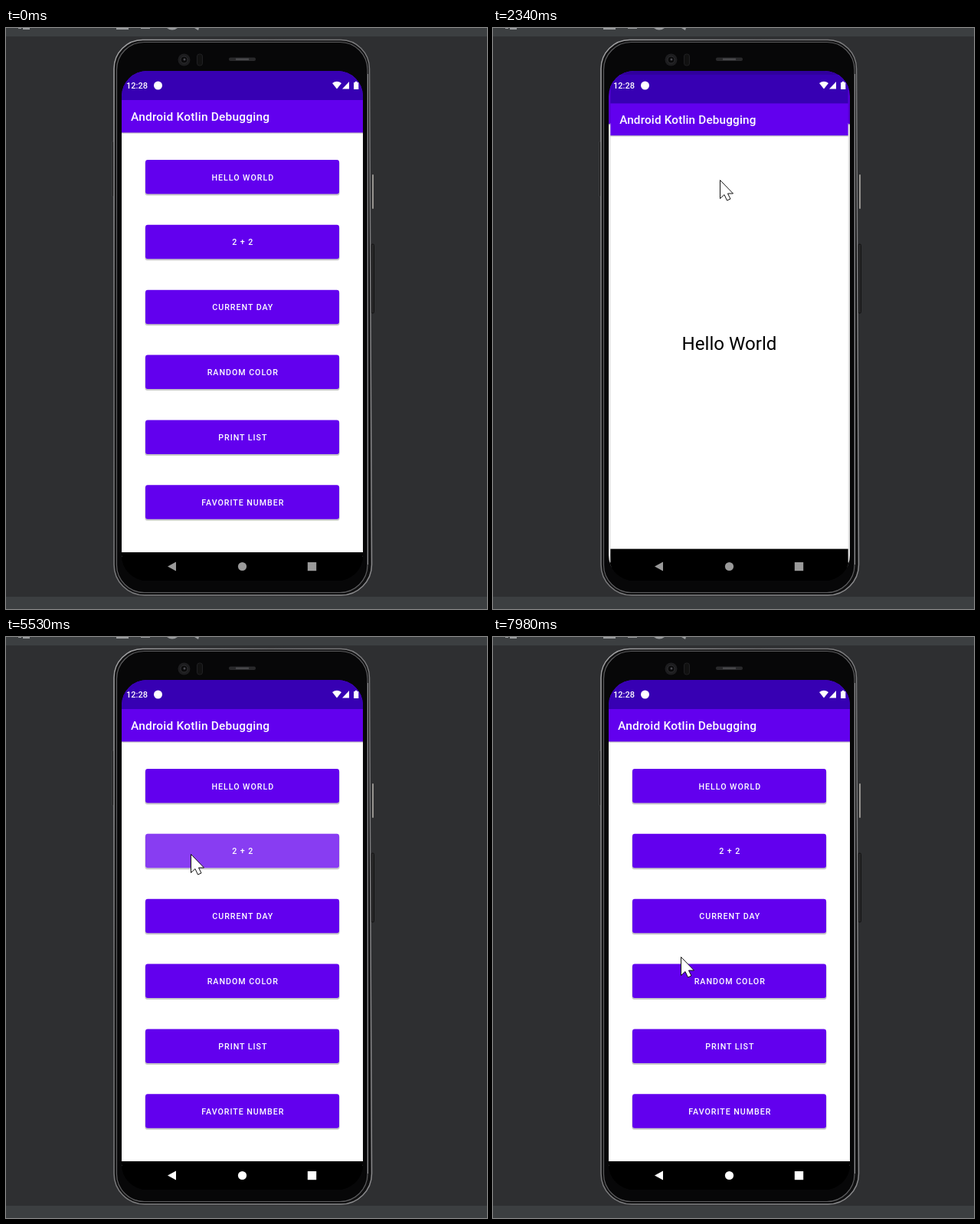
Write an HTML page that moves like this. It is 628 px wide and 758 px high and loops after 8000 ms.

```html
<!DOCTYPE html>
<html lang="en">
<head>
<meta charset="utf-8">
<title>Phone emulator</title>
<style>
html, body { margin: 0; width: 100%; height: 100%; overflow: hidden; background: #2e2f31; }
svg { display: block; }
text { font-family: Roboto, sans-serif; }
.page { transform-origin: 308.5px 388.5px; }
.title { font-size: 15.5px; font-weight: 500; letter-spacing: .0125em; fill: #fff; }
.label { font-size: 10.7px; font-weight: 500; letter-spacing: .956px; fill: #fff; text-anchor: middle; }
.answer { font-size: 24.5px; text-anchor: middle; }
</style>
</head>
<body>
<svg id="stage" width="628" height="758" viewBox="0 0 628 758">
  <defs>
    <clipPath id="screen">
      <rect x="151" y="56" width="315" height="665" rx="33"/>
    </clipPath>
    <linearGradient id="shade" x2="0" y2="1">
      <stop stop-opacity=".28"/><stop offset="1" stop-opacity="0"/>
    </linearGradient>
    <linearGradient id="rim" x2="1" y2="1">
      <stop stop-color="#a4a4a6"/><stop offset=".3" stop-color="#747476"/><stop offset="1" stop-color="#8a8a8c"/>
    </linearGradient>
    <g id="frame">
      <rect x="151" y="120" width="315" height="570" fill="#fff"/>
      <rect x="151" y="56" width="315" height="80.500" fill="#6200ee"/>
      <rect x="151" y="56" width="315" height="38" fill="#3700b3"/>
      <rect x="151" y="136.500" width="315" height="2" fill="url(#shade)"/>
      <rect x="151" y="684" width="315" height="37"/>
      <text class="title" x="163" y="121">Android Kotlin Debugging</text>
    </g>
  </defs>

  <!-- emulator window -->
  <rect width="628" height="758" fill="#2e2f31"/>
  <path d="M0 0H628V11H0ZM0 742H628V758H0Z" fill="#3c3f41"/>
  <path d="M16 0H20V1H16ZM22 0H31V2H22ZM144 0H160V2H144ZM176 0H188V1H176ZM210 0H224Q217 5 210 0ZM246 0H252L251 3Z" fill="#9a9c9e"/>

  <!-- phone body -->
  <rect x="138.500" y="148" width="3" height="72" rx="1" fill="#1b1b1c" stroke="#454547" stroke-width=".7"/>
  <rect x="477" y="282" width="3.500" height="90" rx="1.500" fill="#29292a" stroke="#111"/>
  <rect x="478" y="191" width="2" height="45" rx="1" fill="#96938f"/>
  <path d="M141 53A37.500 37.500 0 0 1 178.500 15.500H437A37.500 37.500 0 0 1 474.500 53L477.500 700A40 40 0 0 1 437.500 740H181A40 40 0 0 1 141 700Z" fill="#111112" stroke="url(#rim)" stroke-width="1.500"/>
  <rect x="144.500" y="18.500" width="327.500" height="718" rx="36" fill="#070708" stroke="#5c5c5e" stroke-width="1.200"/>
  <path d="M472.500 60V700" stroke="#8d8d8f"/>
  <circle cx="232.500" cy="41.500" r="8" fill="#1d1d1f"/>
  <circle cx="232.500" cy="41.500" r="4.500" fill="#0a0a0b" stroke="#303033"/>
  <circle cx="233" cy="41" r="1.500" fill="#4a4a50"/>
  <rect x="249.500" y="34" width="7" height="15" rx="3" fill="#111" stroke="#202022"/>
  <rect x="291" y="38.500" width="35" height="4.500" rx="2" fill="#29292b"/>
  <rect x="300" y="39.500" width="17" height="2.500" fill="#47474a"/>

  <g clip-path="url(#screen)">
    <rect x="151" y="56" width="315" height="665"/>
    <g id="list" class="page">
      <use href="#frame"/>
      <g id="buttons"></g>
      <svg id="ripple" x="182" width="253" height="45">
        <circle id="wave" cy="30" fill="#fff" opacity=".24"/>
      </svg>
    </g>
    <rect id="dim" x="151" y="56" width="315" height="665"/>
    <g id="detail" class="page">
      <use href="#frame"/>
      <text id="answer" class="answer" x="308.500" y="420"></text>
    </g>
  </g>

  <!-- status bar and navigation -->
  <g fill="#fff">
    <text x="157" y="79" font-size="11" font-weight="500">12:28</text>
    <circle cx="198.500" cy="75" r="5.500"/>
    <path d="M426 72Q432 67.500 438 72L432 79.500ZM448 70V79.500H439Z"/>
    <path d="M454 71H455.700V69.800H458.500V71H460.300V80H454Z"/>
  </g>
  <g id="nav">
    <path d="M211 702.500L222 696.500V708.500Z"/>
    <circle cx="308.500" cy="702.500" r="5.600"/>
    <rect x="393.800" y="697" width="11.400" height="11.200"/>
  </g>

  <g id="cursor">
    <circle id="press" r="18" fill="#ff0" opacity=".5"/>
    <path d="M.5 .5V24.500L6 19.500L9.500 27L14 25L10.500 18H17.500Z" fill="#fff" stroke="#111" stroke-width="1"/>
  </g>
</svg>

<script>
const $ = id => document.getElementById(id);
const LOOP = 8000, ANIM = 400, PRESS = 210;

const labels = ['HELLO WORLD', '2 + 2', 'CURRENT DAY', 'RANDOM COLOR', 'PRINT LIST', 'FAVORITE NUMBER'];
const rowY = i => 172 + i * 84.85;
$('buttons').innerHTML = labels.map((label, i) => {
  const y = rowY(i);
  return `<rect x="181.500" y="${y + 1.5}" width="254" height="45" rx="3" opacity=".22"/>
    <rect x="182" y="${y}" width="253" height="44.500" rx="3" fill="#6200ee"/>
    <text class="label" x="309.300" y="${y + 26.5}">${label}</text>`;
}).join('');

const visits = [
  { tap: 1720, open: 2190, back: 3660, close: 3960, x: 297, row: 0, text: 'Hello World' },
  { tap: 5190, open: 5660, back: 7100, close: 7400, x: 241, row: 1, text: '4' }
];

// time, x, y of the pointer tip
const path = [
  [630, 528, 714], [860, 390, 360], [1180, 306, 143], [1390, 297, 203], [1720, 297, 202],
  [2000, 297, 202], [2300, 296, 198], [2480, 296, 198], [2980, 217, 731], [3110, 217, 731],
  [3390, 212, 704], [3900, 212, 704], [4360, 258, 413], [4430, 253, 381], [4710, 241, 283],
  [5900, 241, 283], [6010, 242, 310], [6150, 245, 411], [6770, 225, 683], [6960, 218, 706],
  [7340, 218, 706], [7840, 241, 450], [7980, 245, 417]
];

const clamp = u => Math.min(1, Math.max(0, u));
const mix = (a, b, u) => a + (b - a) * u;
const within = (t, start, length) => t >= start && t < start + length;

function pointer(t) {
  const i = path.findIndex(p => p[0] > t);
  if (i < 1) return path.at(i ? -1 : 0).slice(1);
  const [a, b] = [path[i - 1], path[i]], u = (t - a[0]) / (b[0] - a[0]);
  return [mix(a[1], b[1], u), mix(a[2], b[2], u)];
}

const bezier = (a, b, c, d, u) =>
  a * (1 - u) ** 3 + 3 * b * u * (1 - u) ** 2 + 3 * c * u * u * (1 - u) + d * u ** 3;

// fast start, very slow finish
function ease(x) {
  const [xs, ys] = x < 1 / 6
    ? [[0, .05, .1333, 1 / 6], [0, 0, .06, .4]]
    : [[1 / 6, .2083, .25, 1], [.4, .82, 1, 1]];
  let lo = 0, hi = 1;
  for (let i = 0; i < 20; i++) {
    const mid = (lo + hi) / 2;
    if (bezier(...xs, mid) < x) lo = mid; else hi = mid;
  }
  return bezier(...ys, lo);
}

function draw(t) {
  const v = visits[t < 4700 ? 0 : 1], closing = t >= v.close;
  const u = ease(clamp((t - (closing ? v.close : v.open)) / ANIM));
  const shown = closing ? 1 - clamp((t - v.close - 66) / 50) : clamp((t - v.open) / 50);

  $('list').style.transform = `scale(${closing ? mix(1.1, 1, u) : mix(1, 1.05, u)})`;
  $('detail').style.transform = `scale(${closing ? mix(1, .9, u) : mix(.85, 1, u)})`;
  $('detail').style.opacity = shown;
  $('dim').style.opacity = closing ? 0 : .12 * shown;
  $('answer').textContent = v.text;

  $('ripple').setAttribute('y', rowY(v.row));
  $('wave').setAttribute('cx', v.x - 182);
  $('wave').setAttribute('r', closing ? 0 : 200 * clamp((t - v.tap) / 300));
  $('nav').setAttribute('fill', t < visits[0].close ? '#9a9a9a' : '#fff');

  const pressed = visits.some(w => within(t, w.tap, PRESS) || within(t, w.back, PRESS));
  $('cursor').setAttribute('transform', `translate(${pointer(t)})`);
  $('cursor').style.display = t < path[0][0] ? 'none' : '';
  $('press').style.display = pressed ? '' : 'none';
}

const start = performance.now();
(function tick() {
  draw((performance.now() - start) % LOOP);
  requestAnimationFrame(tick);
})();
</script>
</body>
</html>
```
